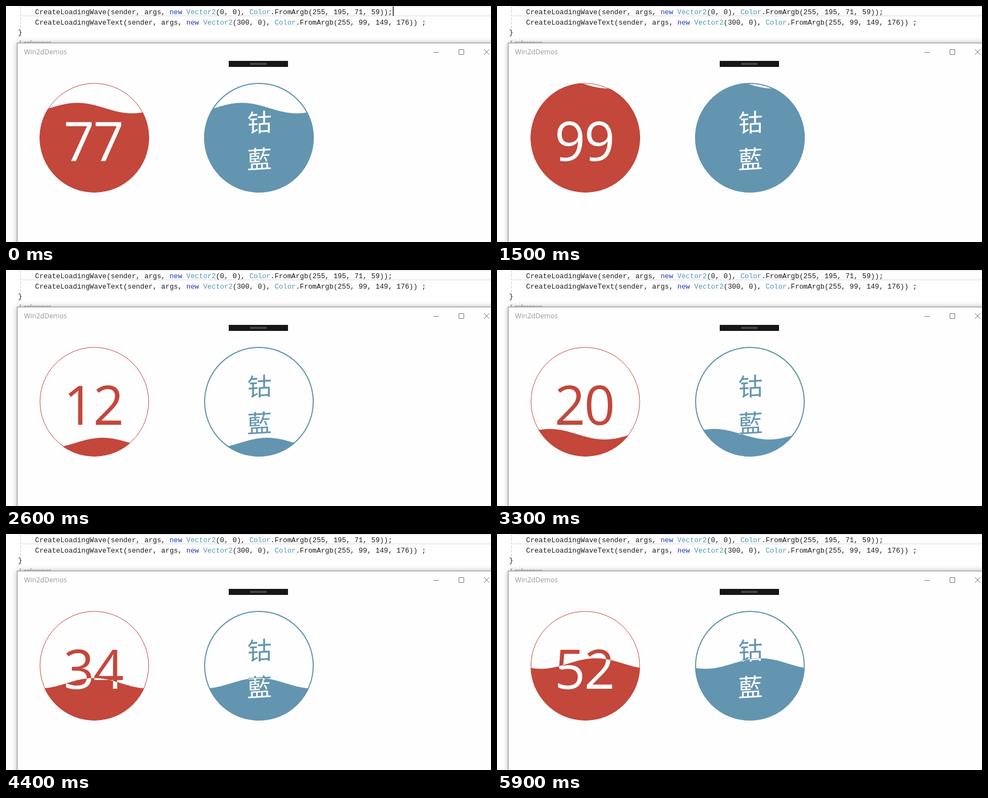
An HTML page with a canvas that plays this animation: 884 by 430 pixels, repeating every 6000 ms.

```html
<!DOCTYPE html>
<html lang="en">
<head>
<meta charset="utf-8">
<title>Loading waves</title>
<style>
html, body { margin: 0; width: 100%; height: 100%; overflow: hidden; background: #fff; }
canvas { display: block; }
</style>
</head>
<body>
<canvas id="stage" width="884" height="430"></canvas>
<script>
const ctx = document.getElementById('stage').getContext('2d');
const LOOP = 6000, STEP = 100, R = 100, CY = 240;
const RED = 'rgb(195,71,59)', BLUE = 'rgb(99,149,176)';
const CODE = '12.78px "Liberation Mono", monospace';
const UI = '"Open Sans", "Noto Sans", sans-serif';
const HAN = '300 45px "Noto Sans CJK SC Light", "Noto Sans CJK SC DemiLight", "Noto Sans CJK SC", sans-serif';
const HELD = [11, 38, 41, 47, 56];  // steps that repeat the previous picture
const LEVELS = [[0, 77], [800, 91.1], [1900, 104.4], [3300, 120.4],
  [4400, 134], [5300, 144.6], [5900, 152]];

function levelAt(t) {
  const i = Math.max(1, LEVELS.findIndex(([time]) => t <= time));
  const [t0, v0] = LEVELS[i - 1], [t1, v1] = LEVELS[i];
  return (v0 + (v1 - v0) * (t - t0) / (t1 - t0)) % 100;
}

function rect(x, y, w, h, color) {
  ctx.fillStyle = color;
  ctx.fillRect(x, y, w, h);
}

function text(str, x, y, font, color, align = 'left') {
  ctx.font = font;
  ctx.fillStyle = color;
  ctx.textAlign = align;
  ctx.fillText(str, x, y);
}

// Words wrapped as *keyword* or _type_ are coloured.
function codeLine(line, x, y) {
  const colors = { '*': '#1e32be', _: '#5095b4' };
  ctx.font = CODE;
  const advance = ctx.measureText('0').width;
  for (const part of line.split(/(\*\w+?\*|_\w+?_)/)) {
    const color = colors[part[0]];
    const word = color ? part.slice(1, -1) : part;
    text(word, x, y, CODE, color || '#1c1c1c');
    x += word.length * advance;
  }
}

function drawEditor(caret) {
  rect(0, 0, 884, 430, '#fff');
  rect(29, 0, 855, 2, '#ececf5');
  rect(29, 17, 855, 2, '#e8e8f3');
  for (let y = 1; y < 40; y += 7) rect(26, y, 1, 4, '#c4c4c4');
  codeLine('CreateLoadingWave(sender, args, *new* _Vector2_(0, 0), _Color_.FromArgb(255, 195, 71, 59));', 53, 14.5);
  codeLine('CreateLoadingWaveText(sender, args, *new* _Vector2_(300, 0), _Color_.FromArgb(255, 99, 149, 176)) ;', 53, 33.5);
  codeLine('}', 22, 51.5);
  text('1 reference', 23, 70.5, '11.3px ' + UI, '#8c8c8c');
  if (caret) rect(705, 1, 1.5, 17, '#111');
}

function drawWindow() {
  ctx.save();
  ctx.shadowColor = 'rgba(0,0,0,.3)';
  ctx.shadowBlur = 10;
  rect(20, 67, 900, 400, '#8a8a8a');
  ctx.restore();
  rect(21, 68, 863, 362, '#fefefe');
  text('Win2dDemos', 33, 88, '12.4px ' + UI, '#999');

  ctx.strokeStyle = '#777';
  ctx.lineWidth = 1;
  ctx.beginPath();
  ctx.moveTo(779, 84.5);
  ctx.lineTo(789, 84.5);
  ctx.rect(825.5, 79.5, 9, 9);
  ctx.moveTo(871, 79);
  ctx.lineTo(881, 89);
  ctx.moveTo(881, 79);
  ctx.lineTo(871, 89);
  ctx.stroke();

  rect(406, 100, 108, 11, '#171717');
  rect(445, 104, 30, 1, '#707070');
  rect(445, 106, 30, 1, '#707070');
}

function drawBall(cx, level, color, lineWidth, label) {
  const disc = r => {
    ctx.beginPath();
    ctx.arc(cx, CY, r, 0, 2 * Math.PI);
  };
  disc(R - 1);
  ctx.strokeStyle = color;
  ctx.lineWidth = lineWidth;
  ctx.stroke();
  label(cx, color);

  ctx.save();
  disc(R);
  ctx.clip();
  const mid = CY + R - 2 * level;
  const crest = cx - 61 - 10 * level;
  ctx.beginPath();
  for (let x = cx - R - 2; x <= cx + R + 2; x += 2) {
    ctx.lineTo(x, mid - 9.6 * Math.cos((x - crest) * Math.PI / R));
  }
  ctx.lineTo(cx + R + 2, CY + R + 20);
  ctx.lineTo(cx - R - 2, CY + R + 20);
  ctx.clip();
  disc(R);
  ctx.fillStyle = color;
  ctx.fill();
  label(cx, '#fff');
  ctx.restore();
}

function drawNumber(value, cx, color) {
  const digits = [...String(value)];
  digits.forEach((d, i) =>
    text(d, cx - 1 + (i - (digits.length - 1) / 2) * 54, 282, '98px ' + UI, color, 'center'));
}

// Brush-style characters: horizontal strokes rise a little to the right.
function drawHan(char, cx, cy, color) {
  ctx.save();
  ctx.transform(1, -0.06, 0, 1, cx, cy);
  text(char, 0, 17, HAN, color, 'center');
  ctx.restore();
}

function draw(time) {
  const now = time % LOOP;
  let step = Math.floor(now / STEP);
  const blink = (step * STEP + 430) % 1060;
  if (HELD.includes(step)) step--;
  const level = levelAt(step * STEP);

  drawEditor(blink < 530);
  drawWindow();
  drawBall(161, level, RED, 1, (cx, color) => drawNumber(Math.floor(level), cx, color));
  drawBall(461, level, BLUE, 2, (cx, color) => {
    drawHan('钴', cx + 1, 212, color);
    drawHan('藍', cx + 1, 279, color);
  });
}

const start = performance.now();
function tick() {
  draw(performance.now() - start);
  requestAnimationFrame(tick);
}
tick();
</script>
</body>
</html>
```
